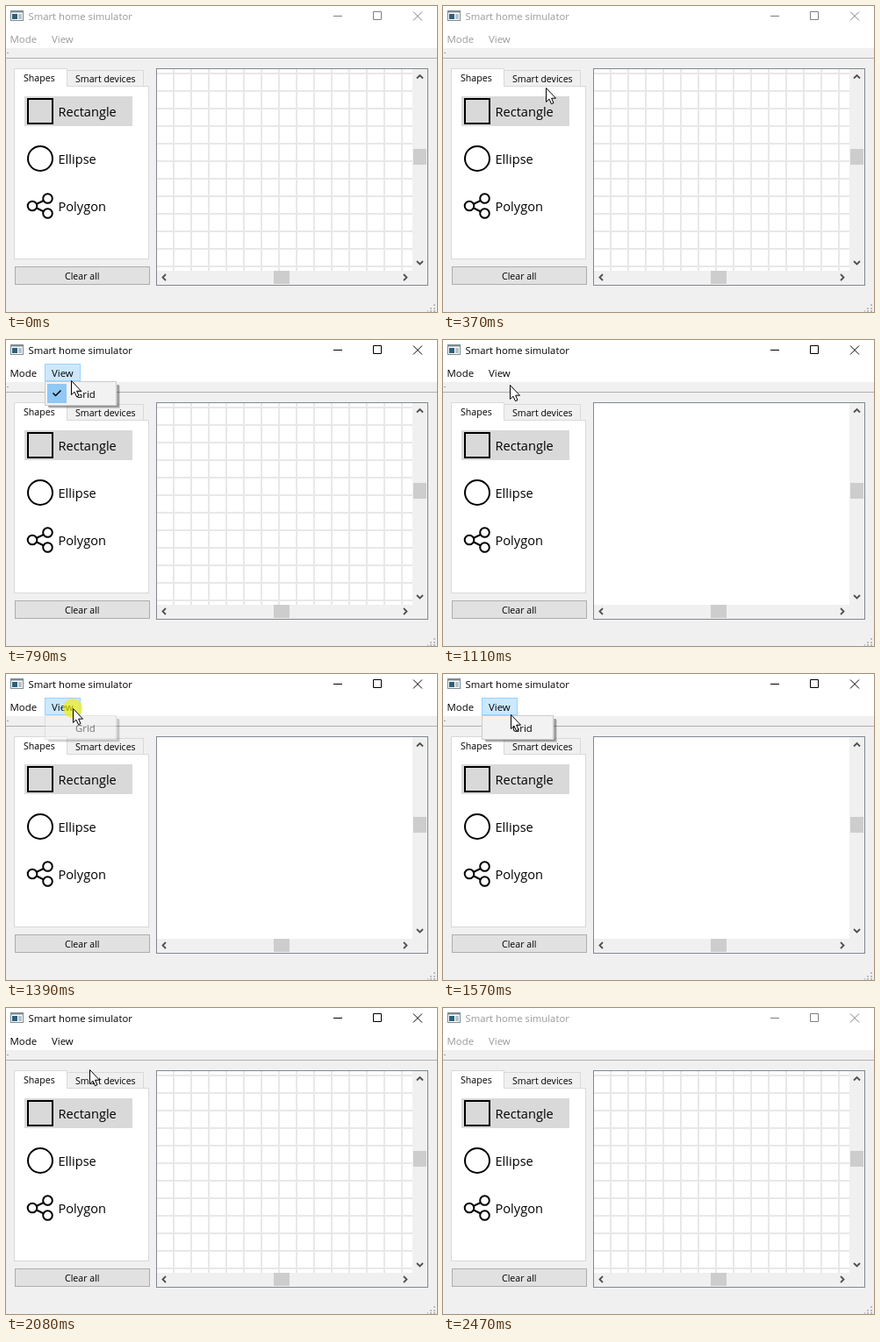
Write an HTML page that moves like this. It is 491x349 px and loops after 2.51 s.

```html
<!DOCTYPE html>
<html lang="en">
<head>
<meta charset="utf-8">
<title>Smart home simulator</title>
<style>
  html, body { margin: 0; width: 100%; height: 100%; overflow: hidden; background: #f0f0f0; }
  svg { display: block; width: 100vw; height: 100vh; font: 11.4px "Open Sans", "Noto Sans", sans-serif; }
  .small { font-size: 10.6px; }
  .large { font-size: 14.6px; }
  .line { fill: none; stroke: #000; }
  .arrows { fill: none; stroke: #505050; stroke-width: 1.8; }
  #caption.idle, #menubar.idle { fill: #999; }
  #caption.idle .line { stroke: #808080; }
</style>
</head>
<body>
<svg viewBox="0 0 491 349">
  <rect width="491" height="349" fill="#f0f0f0"/>
  <rect width="491" height="48" fill="#fff"/>
  <path d="M0 59.5H491" stroke="#b0b0b0"/>
  <path d="M1 53.5h2" stroke="#a0a0a0"/>

  <!-- Title bar -->
  <rect x="5.5" y="5.5" width="14" height="11" fill="#fff" stroke="#7d8a90"/>
  <path d="M5 6.5H20" stroke="#7d8a90" stroke-width="2"/>
  <rect x="7" y="9" width="6" height="6" fill="#2f5f7c"/>
  <rect x="14" y="9" width="4" height="6" fill="#b5c4cc"/>
  <g id="caption">
    <text x="25.5" y="16" font-size="11.3">Smart home simulator</text>
    <path class="line" d="M373 11.5h10M418.5 6.5h9v9h-9zM464 6.500l10 10m0-10l-10 10"/>
  </g>

  <!-- Menu bar -->
  <rect id="viewButton" x="44.5" y="27.5" width="40" height="19"/>
  <g id="menubar">
    <text x="4.500" y="42">Mode</text>
    <text x="52" y="42">View</text>
  </g>

  <!-- Shape palette -->
  <rect x="9.5" y="91.5" width="153" height="197" fill="#fff" stroke="#d9d9d9"/>
  <rect x="69.5" y="73.5" width="87" height="18" fill="#f0f0f0" stroke="#d9d9d9"/>
  <path d="M9.5 92V71.5h60V92" fill="#fff" stroke="#d9d9d9"/>
  <path d="M10 92h59" stroke="#fff" stroke-width="2"/>
  <g class="small">
    <text x="20" y="86">Shapes</text>
    <text x="79" y="87">Smart devices</text>
  </g>
  <rect x="21" y="103" width="123" height="34" fill="#d9d9d9"/>
  <g class="line" stroke-width="2">
    <rect x="25" y="106" width="28" height="28"/>
    <circle cx="39" cy="174" r="14"/>
    <path d="M47 220L30 228L47 236.500"/>
    <g fill="#fff">
      <circle cx="30" cy="228" r="5.3"/>
      <circle cx="47.5" cy="219.5" r="5.3"/>
      <circle cx="47.5" cy="236.5" r="5.3"/>
    </g>
  </g>
  <g class="large">
    <text x="59.500" y="126">Rectangle</text>
    <text x="59.500" y="180">Ellipse</text>
    <text x="59.500" y="234">Polygon</text>
  </g>
  <rect x="10.5" y="297.5" width="153" height="20" fill="#e1e1e1" stroke="#adadad"/>
  <text class="small" x="67" y="312">Clear all</text>

  <!-- Canvas with scroll bars -->
  <rect x="171.5" y="71.5" width="309" height="247" fill="#fff" stroke="#828790"/>
  <path id="grid" fill="none" stroke="#000" stroke-opacity=".09" stroke-width="2"/>
  <path d="M463 72h17v246H172V302H463z" fill="#f0f0f0"/>
  <path d="M464 163h15v18h-15zM305 302h18v15h-18z" fill="#cdcdcd"/>
  <path class="arrows" d="M468 82.500l3.500-3.500 3.500 3.500M468 291l3.500 3.500 3.500-3.500M182 306l-3.500 3.500 3.500 3.500M453 306l3.500 3.500-3.500 3.500"/>
  <path d="M487 341h2M483 345h2m2 0h2M480 348h1m2 0h2m2 0h2" stroke="#bdbdbd" stroke-width="2"/>

  <!-- View menu -->
  <g id="popup">
    <path d="M48 75.500H127.500V51" fill="none" stroke="#000" stroke-opacity=".4" stroke-width="2"/>
    <path d="M49 77H129V52" fill="none" stroke="#000" stroke-opacity=".14" stroke-width="2"/>
    <rect x="44.5" y="47.5" width="81" height="27" fill="#f2f2f2" stroke="#ccc"/>
    <rect id="item" x="47" y="50" width="75" height="22" fill="#90c8f6"/>
    <g id="check">
      <rect x="47" y="50" width="22" height="22" fill="#90c8f6"/>
      <path class="line" d="M53.500 60.500l3 3 6-6" stroke-width="1.5"/>
    </g>
    <text x="79" y="66">Grid</text>
  </g>

  <g id="pointer">
    <circle id="press" r="11" fill="#f5f000" fill-opacity=".65"/>
    <path d="M.5 .5V16.500L4 13.200 6.500 18.700 9 17.600 6.600 12.200H11.500Z" fill="#fff" stroke="#000"/>
  </g>
</svg>
<script>
  const LOOP = 2510, TICK = 46.5;
  const el = id => document.getElementById(id);
  const show = (id, on) => el(id).setAttribute("visibility", on ? "visible" : "hidden");
  const within = (k, from, to) => k >= from && k < to;

  let gridPath = "";
  for (let x = 191; x < 463; x += 20) gridPath += `M${x} 72V302`;
  for (let y = 77; y < 302; y += 20) gridPath += `M172 ${y}H463`;
  el("grid").setAttribute("d", gridPath);

  // Pointer route: tick, x, y
  const route = [
    [3, 330, 340], [6, 180, 170], [9, 85, 55], [11, 70, 36], [14, 70, 36],
    [17, 74, 46], [19, 78, 56], [21, 78, 56], [24, 76, 51], [27, 76, 39],
    [31, 76, 39], [36, 78, 56], [43, 78, 56], [44, 95, 70], [45, 170, 130],
    [46, 290, 225], [47, 410, 320]
  ];

  function pointerAt(k) {
    const i = route.findIndex(([tick]) => tick >= k);
    if (i < 1) return (i ? route.at(-1) : route[0]).slice(1);
    const [t0, x0, y0] = route[i - 1], [t1, x1, y1] = route[i];
    const p = (k - t0) / (t1 - t0);
    return [Math.round(x0 + (x1 - x0) * p), Math.round(y0 + (y1 - y0) * p)];
  }

  function popupOpacity(k) {
    if (within(k, 13, 21)) return [.15, .6][k - 13] ?? 1;
    if (within(k, 29, 40)) return [.25, .5, .8][k - 29] ?? 1;
    return 0;
  }

  function draw(time) {
    const k = Math.floor((time % LOOP + 8) / TICK);
    const [x, y] = pointerAt(k);
    const visible = within(k, 3, 48);
    const open = within(k, 14, 21) || within(k, 29, 40);
    const hover = visible && within(x, 44, 85) && within(y, 27, 47);

    el("caption").classList.toggle("idle", !within(k, 13, 53));
    el("menubar").classList.toggle("idle", !within(k, 14, 53));

    show("viewButton", open || hover);
    el("viewButton").setAttribute("fill", open ? "#cce8ff" : "#e5f3ff");
    el("viewButton").setAttribute("stroke", open ? "#99d1ff" : "#cce8ff");

    const gridOn = !within(k, 21, 40);
    show("grid", gridOn);
    el("popup").setAttribute("opacity", popupOpacity(k));
    show("check", gridOn);
    show("item", open && y >= 50);

    show("pointer", visible);
    el("pointer").setAttribute("transform", `translate(${x} ${y})`);
    show("press", within(k, 12, 15) || within(k, 19, 21) || within(k, 28, 32) || k === 39);
  }

  function frame() {
    draw(performance.now());
    requestAnimationFrame(frame);
  }
  frame();
</script>
</body>
</html>
```
